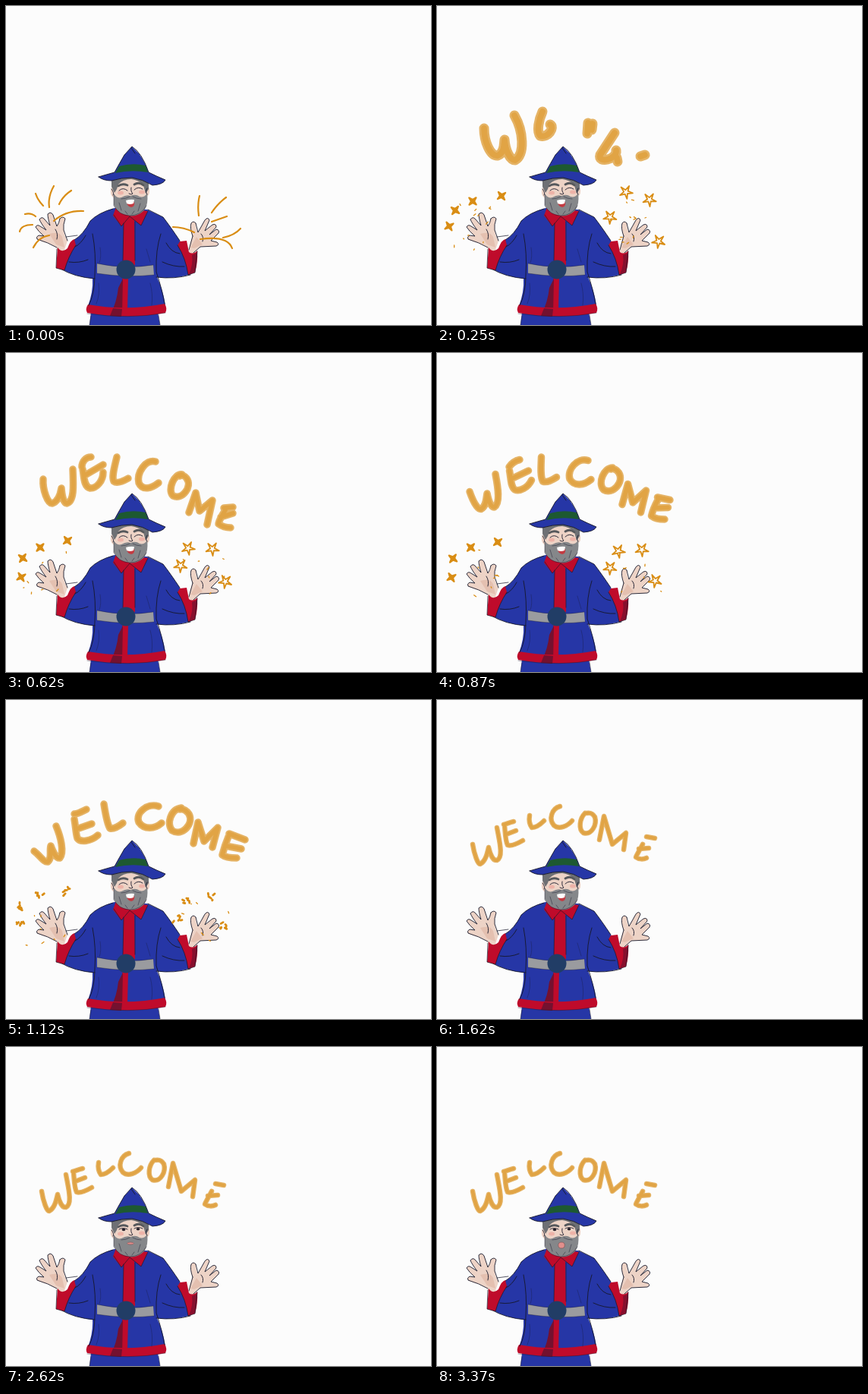
Write an HTML page that moves like this. It is 560 by 420 pixels and loops after 3.62 s.

```html
<!DOCTYPE html>
<html lang="en">
<head>
<meta charset="utf-8">
<title>Welcome wizard</title>
<style>
  html, body { margin: 0; width: 100%; height: 100%; overflow: hidden; background: #fcfcfc; }
  svg { display: block; width: 560px; height: 420px; }
  path { stroke-linecap: round; stroke-linejoin: round; }
  .blue { fill: #2636a6; }
  .red { fill: #bf0b2b; }
  .wine { fill: #74112f; }
  .skin { fill: #edd3c6; }
  .line { fill: none; stroke: #17182a; stroke-width: .9; }
  .gold { fill: none; stroke: #d98d14; }
</style>
</head>
<body>
<svg viewBox="0 0 560 420" aria-label="A wizard conjures the word Welcome">
  <g id="coat">
    <path class="blue" d="M112 403L110 420H203L200 403Z"/>
    <path class="line" d="M112 408L110 420M201 407L203 420" opacity=".6"/>
    <path class="blue" d="M143 266Q122 272 111 283Q101 302 90 308Q77 326 71 345Q88 356 114 359Q115 376 108 395Q160 405 210 394Q207 374 199 357Q221 360 244 353Q238 330 229 309Q217 291 207 278L186 268Z"/>
    <path class="red" d="M155 276H169L170 340L161 358L160 400H152L154 340Z"/>
    <path class="wine" d="M154 359L153 405H138Q146 390 148 371Z"/>
    <g id="hem">
      <path class="red" d="M108 393Q158 402 209 392Q213 398 210 404Q162 413 107 404Q104 399 108 393Z"/>
      <path class="wine" d="M141 398L153 399L152 409L137 408Z"/>
      <path class="line" d="M107 405Q162 413 210 404" opacity=".45"/>
    </g>
    <path class="red" d="M145 265L141 276L152 290L163 277L178 289L187 270Z"/>
    <path class="line" d="M142 275L152 290L163 277L178 289L187 270M155 286L154 335M170 284L170 335" opacity=".7"/>
    <path class="line" d="M141 267Q122 272 111 283Q102 301 90 308M72 346Q90 357 117 359M187 268L207 278Q217 291 229 309M243 354Q222 360 198 357M114 300Q119 326 117 354Q117 379 109 394M204 300Q197 321 198 350Q206 374 209 392M91 317Q99 313 105 302M83 337Q96 339 108 334M229 326Q218 325 211 312M235 343Q221 344 206 337"/>
    <path class="line" d="M124 318Q126 331 123 338M185 320L190 337M122 365Q124 380 119 392M190 365Q194 380 192 394" opacity=".35"/>
    <path fill="#9a9b9f" d="M120 339Q157 347 194 341L195 354Q159 358 120 352Z"/>
    <path class="line" d="M120 339Q157 347 194 341M120 352Q159 358 195 354" opacity=".4"/>
    <circle cx="158" cy="347" r="12.5" fill="#213d66"/>
  </g>
  <g id="arms">
    <path class="skin" d="M67 318Q58 313 55 312Q46 310 41 307Q39 304 43 302L50 303Q42 296 39 291Q41 287 45 290L53 295Q46 286 44 281Q47 277 50 280L58 289Q55 279 55 274Q59 270 62 275L67 290Q70 286 71 280Q75 276 78 280Q75 288 76 295Q77 304 81 309L76 324L67 322Z"/>
    <path class="skin" d="M241 324Q242 311 246 303Q242 292 244 286Q247 282 250 286Q250 294 253 298L262 282Q266 277 268 282L262 296L272 288Q277 286 277 291L268 301L277 294Q282 295 280 299L270 309L278 311Q282 314 277 316Q265 317 256 317Q250 320 248 327Z"/>
    <path fill="#dcae9c" opacity=".5" d="M57 300Q70 296 74 304L77 318L66 314ZM251 304L259 314L248 319L243 318Z"/>
    <path class="line" d="M67 318Q55 311 41 307Q39 304 43 302L50 303Q42 296 39 291Q41 287 45 290L53 295Q46 286 44 281Q47 277 50 280L58 289Q55 279 55 274Q59 270 62 275L67 290Q70 286 71 280M65 294Q69 300 67 307" stroke-width=".8"/>
    <path class="line" d="M71 280Q75 276 78 280Q75 288 76 295L81 309M246 303Q242 292 244 286Q247 282 250 286" stroke-width="1.7"/>
    <path class="line" d="M241 321L246 303M250 286L253 298L262 282Q266 277 268 282L262 296L272 288Q277 286 277 291L268 301L277 294Q282 295 280 299L270 309L278 311Q282 314 277 316L256 317L247 325M257 300Q261 304 259 310" stroke-width=".8"/>
    <path class="red" d="M90 307Q85 308 81 319Q74 326 68 318L66 345L77 348Q82 330 92 315Z"/>
    <path class="red" d="M229 310L238 309L241 324Q247 328 252 322Q253 338 249 351L240 354Q237 332 226 315Z"/>
    <path class="wine" opacity=".75" d="M252 325L249 350L241 353Q247 340 245 328Z"/>
    <path class="line" d="M79 304L94 302M67 320L66 345L77 348Q82 330 92 315M252 323L249 351L240 354Q237 332 226 315" opacity=".8"/>
  </g>
  <g id="head">
    <path class="skin" d="M143 239Q137 237 138 247Q140 254 145 252L147 262H181L184 251Q190 250 189 241Q188 235 184 238L183 222H143Z"/>
    <path fill="#6e7074" d="M139 226Q163 217 188 229L188 241L184 247L181 236Q175 229 165 228Q154 228 148 235L146 241L143 246L139 238Z"/>
    <ellipse cx="151" cy="246" rx="4" ry="2.5" fill="#ec9f94" opacity=".6"/>
    <ellipse cx="179" cy="245" rx="4" ry="2.5" fill="#ec9f94" opacity=".6"/>
    <path fill="#85878a" d="M142 247Q146 254 152 252Q159 248 164 250Q171 247 176 251Q183 253 186 246Q188 263 181 270Q172 278 162 276Q147 274 142 262Z"/>
    <path class="line" stroke-width=".6" opacity=".5" d="M142 248L142 263Q150 276 163 276Q178 276 185 263M149 259L152 269M157 270L160 274M177 260L174 270M169 270L166 274M152 254Q158 254 163 251M167 251Q172 254 178 254"/>
    <path fill="none" stroke="#56585c" stroke-width="2.8" d="M148 237Q153 233 160 236M169 235Q175 231 181 236"/>
    <path class="line" d="M165 239Q164 244 167 247Q165 249 162 247M139 241Q143 246 141 249M186 240Q183 245 186 248" stroke-width=".8"/>
    <path id="eyes" class="line" stroke-width="1.5"/>
    <g id="pupils" fill="#25202a">
      <ellipse cx="155" cy="240.5" rx="2.3" ry="1.7"/><ellipse cx="174" cy="239.7" rx="2.3" ry="1.7"/>
    </g>
    <g id="smile">
      <path fill="#c33b42" d="M159 259L169 258Q170 264 165 265Q160 264 159 259Z"/>
      <path fill="#fff" d="M158 256Q164 254 169 255L168 260Q163 262 159 260Z"/>
    </g>
    <ellipse id="mouth" cx="164" rx="4.2" fill="#e28f8c" stroke="#7b4d51" stroke-width=".6"/>
    <path class="blue" d="M122 225Q132 222 143 219Q149 208 156 196L166 185L175 194Q184 207 188 219Q198 224 210 229Q207 235 193 236Q180 228 166 226Q152 226 139 230Q128 230 122 225Z"/>
    <path fill="#1d5931" d="M149 211Q166 206 184 210L187 219Q165 215 144 220Z"/>
    <path class="line" d="M122 225Q132 222 143 219Q149 208 156 196L166 185Q179 193 188 219Q198 224 210 229Q207 235 193 236Q180 228 166 226Q152 226 139 230Q128 230 122 225M165 187L170 194"/>
  </g>
  <g id="letters"></g>
  <g id="sparks"></g>
</svg>
<script>
const LOOP = 3620;
const STEPS = [0, 120, 250, 370, 500, 620, 750, 870, 1000, 1120, 1370, 1620,
  2250, 2370, 2620, 2750, 2870, 3120, 3250, 3370];
const $ = id => document.getElementById(id);

const FIRST_STROKES = [
  "M62 161C62 178 70 198 80 197C90 193 88 180 89 176C90 190 96 203 103 203C116 195 114 165 102 144",
  "M139 139C134 150 131 165 136 171C146 174 156 160 149 156",
  "M199 154L198 168M205 155L204 163",
  "M234 167L215 196C211 208 238 202 236 190M237 200L238 205",
  "M268 198L274 196"
];
// Each letter has three poses: freshly written, swinging and at rest.
const WORD = [
  ["M49 166C48 180 55 199 61 198C70 195 72 184 73 178C74 190 76 197 80 198C90 196 89 175 88 153",
   "M37 199C45 205 50 214 55 213C61 208 57 199 59 192C62 200 66 209 71 208C77 200 72 180 66 166",
   "M47 190C49 203 54 217 57 216C64 212 66 203 68 194C70 203 74 212 79 211C88 207 82 185 79 168"],
  ["M101 153C103 162 102 176 111 178C120 178 128 168 128 157M104 161L128 147M100 150C100 143 105 137 112 137",
   "M90 157C92 168 92 176 94 182C98 188 112 186 121 178M93 170L113 163M90 150C95 150 100 147 106 144",
   "M89 165C90 175 90 185 93 191C98 193 106 189 113 185M91 177L104 172M88 164C92 163 96 161 101 160"],
  ["M146 137C143 150 139 163 142 169C146 172 154 169 161 165",
   "M129 137C131 150 133 163 137 169C143 170 149 166 154 162",
   "M122 152C121 158 122 164 125 168C131 168 136 164 141 159"],
  ["M197 143C184 139 172 158 175 171C180 182 192 178 201 171",
   "M201 140C186 135 170 149 175 161C182 171 196 170 205 162",
   "M162 140C151 143 147 157 154 165C161 171 172 166 178 159"],
  ["M232 160C222 158 212 180 220 188C232 194 246 176 238 165C236 162 232 160 229 162",
   "M231 142C217 144 211 163 219 172C232 180 248 163 241 150C238 146 234 143 229 144",
   "M195 149C188 156 186 170 193 175C204 178 211 164 208 154C205 149 202 148 197 149"],
  ["M241 210L250 184L255 208L272 194L265 226",
   "M247 189L253 161L261 186L279 168L272 194",
   "M214 184L220 153L231 190L249 175L246 197"],
  ["M289 207C285 213 281 220 280 225C284 228 290 230 296 230M283 216L299 211M287 204L299 203",
   "M293 180C290 187 287 196 285 204C290 208 298 208 304 208M289 192L310 196M294 176L315 184",
   "M271 190C268 196 264 202 262 207C266 210 272 210 276 208M266 196L279 195M276 180L287 182"]
];
const BURST = "M39 247Q42 256 49 263M57 265Q55 251 63 237M70 261Q75 250 86 243M63 283Q79 269 102 270" +
  "M25 274Q33 272 39 277M18 297Q20 288 35 288M36 318Q43 304 57 302M254 276Q252 262 255 250" +
  "M271 272Q279 260 290 252M271 284L291 277M309 293Q301 302 286 305M220 291Q234 291 248 298M256 307Q292 302 298 319";
// x, y of each star when it appears, when the word is written, when it crumbles.
const STARS = [
  [24, 269, 22, 270, 20, 271], [47, 257, 45, 256, 44, 256], [85, 250, 81, 247, 79, 251], [16, 290, 20, 295, 18, 296],
  [249, 245, 240, 257, 238, 265], [280, 255, 272, 258, 268, 260], [228, 278, 230, 280, 226, 286], [292, 310, 289, 301, 286, 299]
];

const mix = (a, b, k) => a + (b - a) * k;
const ramp = (t, a, b) => Math.max(0, Math.min(1, (t - a) / (b - a)));
const rand = n => { const v = Math.sin(n * 91.7 + 4.1) * 43758.5; return v - Math.floor(v); };
function mixPath(a, b, k) {
  const target = b.match(/\d+/g);
  let i = 0;
  return a.replace(/\d+/g, n => " " + mix(+n, +target[i++], k).toFixed(1));
}
const gold = (d, width, extra = "") => `<path class="gold" d="${d}" stroke-width="${width}" ${extra}/>`;
function brush(d, width, drawn = 1) {
  const dash = drawn < 1 ? `pathLength="1" stroke-dasharray="${drawn} 2"` : "";
  return gold(d, width, `opacity=".65" ${dash}`) + gold(d, width * .6, `opacity=".4" ${dash}`);
}

function letters(t) {
  if (t < 120) return "";
  if (t < 370) return FIRST_STROKES.map(d => brush(d, 13, t < 250 ? .5 : 1)).join("");
  const drawn = t < 500 ? .6 : t < 620 ? .85 : 1;
  const swing = ramp(t, 620, 1120), settle = ramp(t, 1120, 1620);
  return WORD.map(([a, b, c]) =>
    brush(settle ? mixPath(b, c, settle) : mixPath(a, b, swing), mix(9.5, 6.5, settle), drawn)).join("");
}

function starPath(x, y, r, points, turn) {
  let d = "";
  for (let i = 0; i < points * 2; i++) {
    const a = turn + i * Math.PI / points, k = i % 2 ? r * .32 : r;
    d += (i ? "L" : "M") + (x + Math.cos(a) * k).toFixed(1) + " " + (y + Math.sin(a) * k).toFixed(1);
  }
  return d + "Z";
}
function crumbs(x, y, count, spread, seed) {
  let d = "";
  for (let i = 0; i < count; i++) {
    const n = seed + i * 7, off = k => (rand(n + k) * 2 - 1);
    d += `M${(x + off(0) * spread).toFixed(1)} ${(y + off(1) * spread).toFixed(1)}l${(off(2) * 3).toFixed(1)} ${(off(3) * 3).toFixed(1)}`;
  }
  return d;
}

function sparks(t) {
  if (t < 120) return gold(BURST, 2.2);
  if (t >= 1620) return "";
  const drift = ramp(t, 250, 620), fall = ramp(t, 620, 1120);
  let out = "";
  STARS.forEach(([x0, y0, x1, y1, x2, y2], i) => {
    const x = mix(mix(x0, x1, drift), x2, fall), y = mix(mix(y0, y1, drift), y2, fall);
    const left = i < 4;
    if (t >= 1000) {
      out += gold(crumbs(x, y, t < 1370 ? 5 : 2, 5, i * 13), t < 1370 ? 2.8 : 1.8);
    } else {
      const size = (left ? 6.5 : 9) * (t < 250 ? .6 : 1);
      const star = starPath(x, y, size, left ? 4 : 5, left ? .65 + i * .12 : -1.5 + i * .1);
      out += gold(star, left ? 2.2 : 1.8, left ? `style="fill:#d98d14"` : "");
    }
  });
  const count = t < 370 ? 12 : t < 1370 ? 7 : 4;
  return out + gold(crumbs(48, 290, count, 34, t) + crumbs(262, 285, count, 34, t + 99), 1.3);
}

function face(t) {
  const opening = t >= 2250, open = t >= 2370;
  $("eyes").setAttribute("d", open
    ? "M149 240Q154 237 160 240M169 239Q174 236 180 239"
    : opening ? "M149 241L160 241M169 240L180 240" : "M149 243Q154 238 160 243M169 242Q174 237 180 241");
  $("pupils").style.display = open ? "" : "none";
  $("smile").style.display = open ? "none" : "";
  $("mouth").style.display = open ? "" : "none";
  const talk = t >= 2620 ? STEPS.filter(s => s >= 2620 && s <= t).length - 1 : 2;
  const height = [1.5, 2.8, 4][talk % 3];
  $("mouth").setAttribute("ry", height);
  $("mouth").setAttribute("cy", 257 + height);
  $("hem").setAttribute("transform", opening ? "translate(0 -1)" : "");
}

let shown = -1;
function draw(time) {
  const step = STEPS.filter(s => s <= time).pop();
  if (step === shown) return;
  shown = step;
  $("letters").innerHTML = letters(step);
  $("sparks").innerHTML = sparks(step);
  face(step);
}
const start = performance.now();
function tick() {
  draw((performance.now() - start) % LOOP);
  requestAnimationFrame(tick);
}
tick();
</script>
</body>
</html>
```
